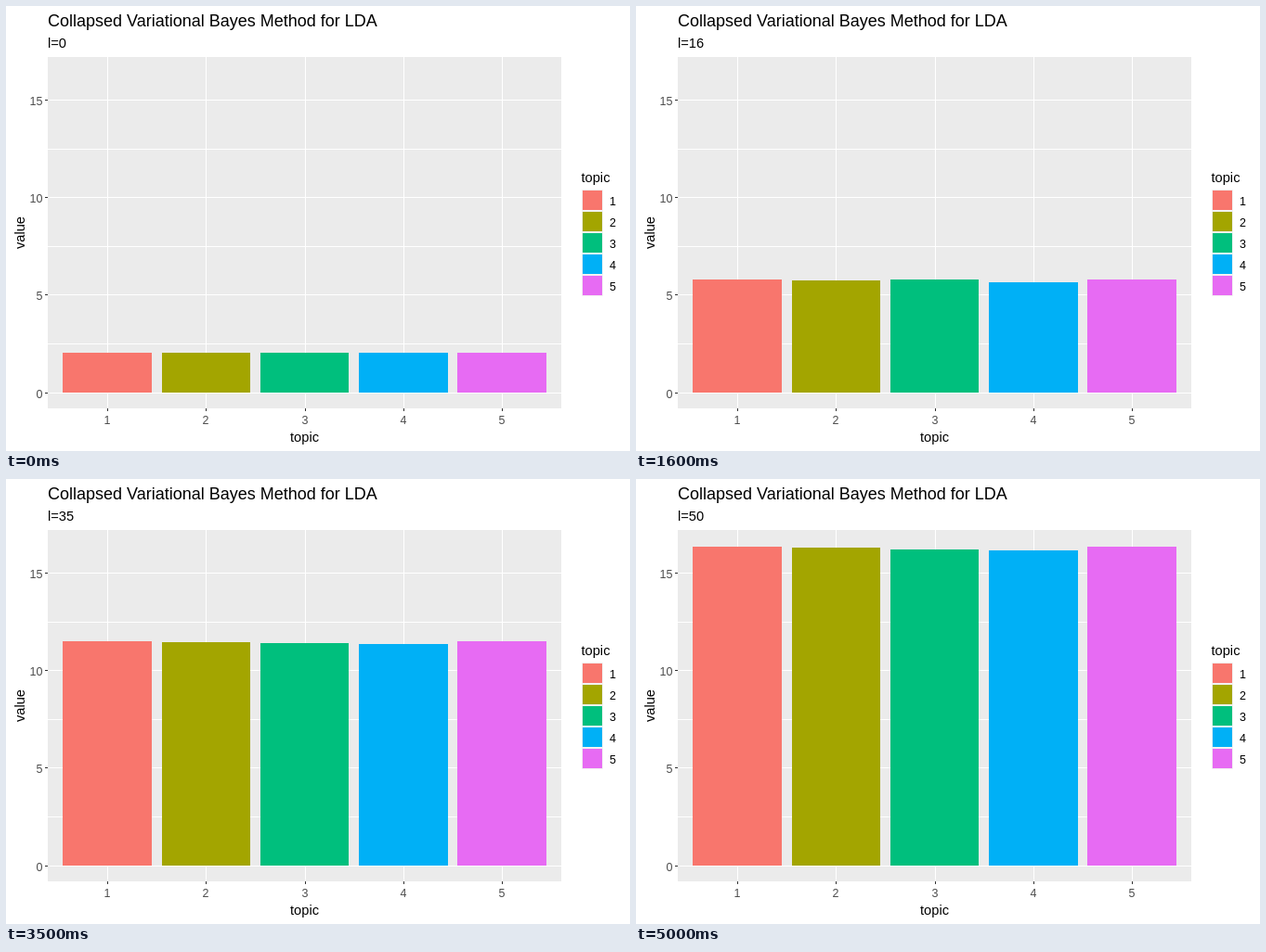
Recreate the animation shown at these times as an HTML page. Size 672 px wide and 480 px high, loop 5100 ms.

```html
<!DOCTYPE html>
<html lang="en">
<head>
<meta charset="utf-8">
<title>Topic bars</title>
<style>
  html, body { margin: 0; width: 100%; height: 100%; overflow: hidden; background: #fff; }
  svg { display: block; font-family: "Liberation Sans", Arial, sans-serif; }
  rect { shape-rendering: crispEdges; }
</style>
</head>
<body>
<svg id="chart" width="672" height="480" viewBox="0 0 672 480"></svg>
<script>
const STEP_MS = 100, STEPS = 51;
const PANEL = { x: 45, y: 55, width: 553, height: 379 };
const LABEL = 12.5, HEADING = 14.67, TITLE = 18;

// early, late: lead in pixels over the lowest bar near the start and at the end
const TOPICS = [
  { color: '#F8766D', early: 2, late: 4 },
  { color: '#A3A500', early: 1, late: 3 },
  { color: '#00BF7D', early: 3.3, late: 1 },
  { color: '#00B0F6', early: 0, late: 0 },
  { color: '#E76BF3', early: 2, late: 4 },
];

const chart = document.getElementById('chart');
const centerX = i => 109 + 106.3 * i;
const valueY = value => Math.round(416.6 - 21.04 * value);
const settle = (step, steps) => 1 - Math.exp(-step / steps);

function add(tag, attrs, content = '') {
  const el = document.createElementNS('http://www.w3.org/2000/svg', tag);
  for (const key in attrs) el.setAttribute(key, attrs[key]);
  el.textContent = content;
  return chart.appendChild(el);
}
const rect = (x, y, width, height, fill) => add('rect', { x, y, width, height, fill });
const text = (content, x, y, size, anchor = 'start', fill = '#000') =>
  add('text', { x, y, 'font-size': size, 'text-anchor': anchor, fill }, content);

// Growth starts slowly and settles to 7 px per step.
function barTop({ early, late }, step) {
  const lowest = 374 - 7 * step + 54.5 * settle(step, 15);
  const lead = early + (late - early) * step / (STEPS - 1);
  return Math.round(lowest - lead * settle(step, 3));
}

text('Collapsed Variational Bayes Method for LDA', 45, 22, TITLE);
const subtitle = text('', 45, 45, HEADING);

rect(PANEL.x, PANEL.y, PANEL.width, PANEL.height, '#EBEBEB');
for (let value = 0; value <= 15; value += 2.5) {
  const y = valueY(value);
  rect(PANEL.x, y, PANEL.width, 1, '#fff');
  if (value % 5) continue;
  rect(PANEL.x - 3, y, 3, 1, '#333');
  text(value, 39.5, y + 6, LABEL, 'end', '#4D4D4D');
}
text('topic', 321.5, 470, HEADING, 'middle');
text('value', 0, 0, HEADING, 'middle').setAttribute('transform', 'translate(20 244.5) rotate(-90)');

text('topic', 619.5, 190, HEADING);
rect(620, 198, 23, 115, '#F2F2F2');

const bars = TOPICS.map(({ color }, i) => {
  const x = Math.round(centerX(i)), keyY = 199 + 23 * i;
  rect(x, PANEL.y, 1, PANEL.height, '#fff');
  rect(x, PANEL.y + PANEL.height, 1, 3, '#333');
  text(i + 1, x, 451, LABEL, 'middle', '#4D4D4D');
  rect(621, keyY, 21, 21, color);
  text(i + 1, 650, keyY + 16, LABEL);

  const left = Math.round(centerX(i) - 47.8), right = Math.round(centerX(i) + 47.8);
  return rect(left, 0, right - left, 0, color);
});

function draw(now) {
  const step = Math.floor(now / STEP_MS) % STEPS;
  subtitle.textContent = 'l=' + step;
  bars.forEach((bar, i) => {
    const top = barTop(TOPICS[i], step);
    bar.setAttribute('y', top);
    bar.setAttribute('height', valueY(0) - top);
  });
  requestAnimationFrame(draw);
}
draw(performance.now());
</script>
</body>
</html>
```
